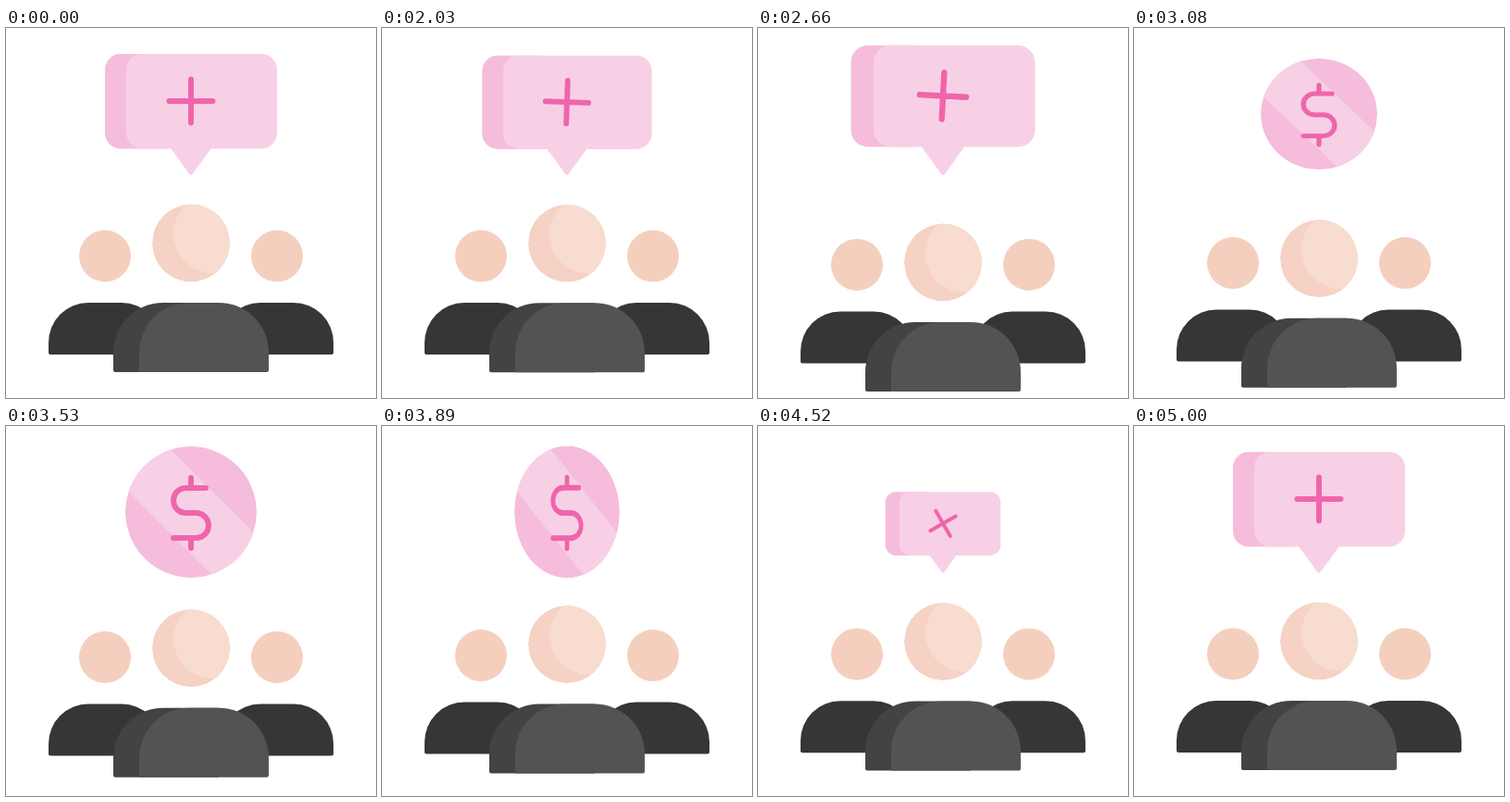
An HTML page that plays this animation: 400x400 px, repeating every 5030 ms.

```html
<!DOCTYPE html>
<html lang="en">
<head>
<meta charset="utf-8">
<title>Team reward</title>
<style>
  html, body { margin: 0; width: 100%; height: 100%; overflow: hidden; background: #fff; }
  svg { display: block; width: 100vw; height: 100vh; }
</style>
</head>
<body>
<svg viewBox="0 0 400 400">
  <defs>
    <clipPath id="face"><circle cx="200" cy="232.5" r="42"/></clipPath>
    <clipPath id="disc"><circle r="71"/></clipPath>
    <path id="shoulders" d="M46 340A43 43 0 0 1 89 297H125A43 43 0 0 1 168 340V351Q168 353 166 353H48Q46 353 46 351Z"/>
    <g id="member">
      <use href="#shoulders" fill="#363636"/>
      <circle cx="107" cy="246.5" r="28" fill="#f5cfbe"/>
    </g>
  </defs>

  <g id="sides">
    <use href="#member"/>
    <use href="#member" transform="translate(400 0) scale(-1 1)"/>
  </g>

  <g id="leader">
    <path fill="#434343" d="M116 351A54 54 0 0 1 170 297H230V372H118Q116 372 116 370Z"/>
    <path fill="#535353" d="M144 351A54 54 0 0 1 198 297H230A54 54 0 0 1 284 351V370Q284 372 282 372H144Z"/>
    <g clip-path="url(#face)">
      <circle cx="200" cy="232.5" r="42" fill="#f5d2c4"/>
      <circle cx="223" cy="223" r="42" fill="#f8dcd0"/>
    </g>
  </g>

  <g id="bubble">
    <rect x="107" y="28" width="80" height="102.5" rx="17" fill="#f5bddb"/>
    <rect x="130" y="28" width="163" height="102.5" rx="17" fill="#f8d0e6"/>
    <path fill="#f8d0e6" d="M178 130H222L202 157.5Q200 160.5 198 157.5Z"/>
    <path id="plus" d="M200 55.5V102.5M176.5 79H223.5" stroke="#ef65ab" stroke-width="6" stroke-linecap="round"/>
  </g>

  <g id="coin">
    <g clip-path="url(#disc)">
      <circle r="71" fill="#f5bddb"/>
      <rect x="-80" y="-32" width="160" height="64" transform="rotate(45)" fill="#f8d0e6"/>
    </g>
    <path fill="none" stroke="#ef65ab" stroke-width="6" stroke-linecap="round"
      d="M0 -37V-27M0 28V39M16 -26H-5.5A13.5 13.5 0 0 0 -5.5 1H5.5A13.5 13.5 0 0 1 5.5 28H-19"/>
  </g>
</svg>
<script>
const LOOP = 5030, HOLD = 2030, STEP = 30;
const $ = id => document.getElementById(id);

// Solve a CSS-like cubic bezier by bisection
const bezier = (x1, y1, x2, y2) => x => {
  const at = (a, b, u) => 3 * (1 - u) ** 2 * u * a + 3 * (1 - u) * u * u * b + u ** 3;
  let lo = 0, hi = 1;
  for (let i = 0; i < 24; i++) {
    const mid = (lo + hi) / 2;
    if (at(x1, x2, mid) < x) lo = mid; else hi = mid;
  }
  return at(y1, y2, (lo + hi) / 2);
};
const settle = bezier(.33, 0, .2, 1);
const swing = x => (1 - Math.cos(Math.PI * x)) / 2;
const out = x => 1 - (1 - x) ** 2;
const into = x => x * x;

// Rows: time, values, ease used to arrive there
const DROP = [
  [2000, [0]],
  [2590, [21], settle],
  [5000, [0], settle],
];
// scale, plus angle
const BUBBLE = [
  [2000, [1, 0]],
  [2220, [.7, 45], swing],
  [2560, [1.076, 90], swing],
  [2660, [1.07, 93], swing],
  [2860, [0, 135], into],
  [4290, [0, -90]],
  [4850, [1, 0], settle],
];
// scale x, scale y
const COIN = [
  [2840, [0, 0]],
  [3080, [.887, .845], out],
  [3530, [1, 1], out],
  [3640, [1.025, 1.025], swing],
  [4160, [.549, .986], swing],
  [4310, [0, .9], out],
];

function sample(keys, t) {
  const i = keys.findIndex(k => k[0] > t);
  if (i === 0) return keys[0][1];
  if (i < 0) return keys[keys.length - 1][1];
  const [t0, from] = keys[i - 1], [t1, to, ease = swing] = keys[i];
  const p = ease((t - t0) / (t1 - t0));
  return from.map((v, n) => v + (to[n] - v) * p);
}

function place(id, transform, shown = true) {
  $(id).setAttribute("transform", transform);
  $(id).style.display = shown ? "" : "none";
}

function draw(ms) {
  const t = ms < HOLD ? 2000 : HOLD + Math.floor((ms - HOLD) / STEP) * STEP;
  const [drop] = sample(DROP, t);
  const [size, turn] = sample(BUBBLE, t);
  const [sx, sy] = sample(COIN, t);
  place("leader", `translate(0 ${drop})`);
  place("sides", `translate(0 ${drop * .45})`);
  place("bubble", `translate(200 159) scale(${size}) translate(-200 -159)`, size > .005);
  place("plus", `rotate(${turn} 200 79)`);
  place("coin", `translate(200 93) scale(${sx} ${sy})`, sx > .005);
}

const start = performance.now();
function tick() {
  draw((performance.now() - start) % LOOP);
  requestAnimationFrame(tick);
}
tick();
</script>
</body>
</html>
```
